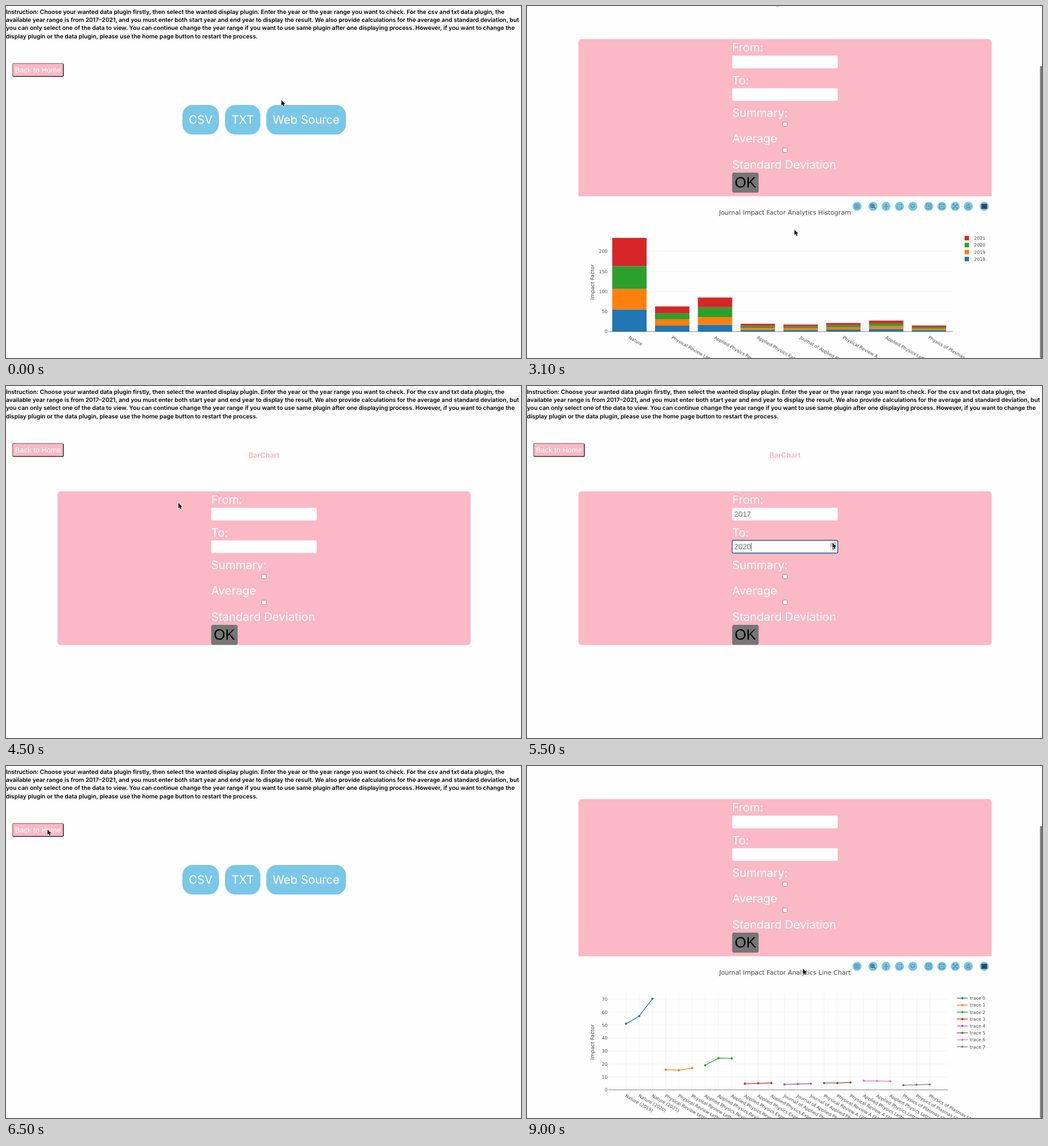
Write an HTML page that moves like this. It is 905 px wide and 619 px high and loops after 9.1 s.

```html
<!DOCTYPE html>
<html lang="en">
<head>
<meta charset="utf-8">
<title>Journal Impact Factor Analytics</title>
<style>
html, body { margin: 0; width: 100%; height: 100%; overflow: hidden; background: #fefefe; }
svg { display: block; width: 905px; height: 619px; }
text { font: 20.4px Inter, "Open Sans", sans-serif; font-optical-sizing: none; text-rendering: geometricPrecision; white-space: pre; }
.info { font-size: 10.31px; font-weight: 600; }
.head { font-size: 12.7px; font-weight: 600; fill: #fab3c1; text-anchor: middle; }
.ui { font-family: "Liberation Sans", Arial, sans-serif; }
.plot text { font: 7.8px "DejaVu Sans", Verdana, sans-serif; fill: #444; }
.plot .title { font-size: 11.05px; text-anchor: middle; }
.plot .axis { font-size: 9.1px; text-anchor: middle; }
.plot .tick { text-anchor: end; }
</style>
</head>
<body>
<svg id="stage" viewBox="0 0 905 619"></svg>
<script>
const LOOP = 9100, STEP = 100, PAGE = 746, VIEW = 619;
const PINK = '#fbb8c5', BLUE = '#7ac7e8';
const COLORS = ['#1f77b4', '#ff7f0e', '#2ca02c', '#d62728', '#9467bd', '#8c564b', '#e377c2', '#7f7f7f'];
const stage = document.getElementById('stage');

const INFO = [
  'Instruction: Choose your wanted data plugin firstly, then select the wanted display plugin. Enter the year or the year range you want to check. For the csv and txt data plugin, the',
  'available year range is from 2017–2021, and you must enter both start year and end year to display the result. We also provide calculations for the average and standard deviation, but',
  'you can only select one of the data to view. You can continue change the year range if you want to use same plugin after one displaying process. However, if you want to change the',
  'display plugin or the data plugin, please use the home page button to restart the process.'
];

// Impact factors for 2017 to 2021
const JOURNALS = [
  ['Nature', 42, 55, 51, 57, 70.3],
  ['Physical Review Letters', 14, 15, 15.6, 15.2, 16.8],
  ['Applied Physics Reviews', 13, 17, 19, 24.5, 24.3],
  ['Applied Physics Express', 4.2, 4.4, 4.7, 5, 5.3],
  ['Journal of Applied Physics', 3.9, 4, 4.2, 4.5, 4.7],
  ['Physical Review A', 4.8, 5, 5.3, 5.3, 5.7],
  ['Applied Physics Letters', 6.6, 6.8, 7, 6.9, 6.6],
  ['Physics of Plasmas', 3.2, 3.4, 3.6, 3.9, 4.2]
];

// Page shown from each moment on
const SCENES = [
  [0, 'home'], [400, 'pick'], [1500, 'form', 'Histogram'], [2600, 'chart', 'Histogram'],
  [3700, 'home'], [4100, 'pick'], [4500, 'form', 'Bar'], [5700, 'chart', 'Bar'],
  [6500, 'home'], [7000, 'pick'], [7500, 'form', 'Line'], [8500, 'chart', 'Line']
];
// Year fields: time, from, to, focused field
const FIELDS = [
  [0, '', '', -1], [1900, '2017', '', 0], [2000, '2018', '', 0], [2200, '2018', '2020', 1],
  [2300, '2018', '2021', 1], [2600, '', '', -1],
  [4800, '2017', '', 0], [5100, '2017', '2017', 1], [5200, '2017', '2018', 1],
  [5300, '2017', '2019', 1], [5400, '2017', '2020', 1], [5700, '', '', -1],
  [7700, '2017', '', 0], [7800, '2018', '', 0], [7900, '2019', '', 0],
  [8100, '2019', '2019', 1], [8200, '2019', '2020', 1], [8300, '2019', '2021', 1], [8500, '', '', -1]
];
const CURSOR = [
  [0, 484, 165], [100, 571, 202], [300, 571, 202], [1000, 569, 230], [1200, 569, 230], [1300, 569, 231],
  [1500, 571, 228], [1700, 633, 208], [1900, 538, 220], [2000, 538, 220], [2200, 538, 276], [2300, 538, 276],
  [2500, 386, 436], [2700, 470, 400], [3300, 470, 390], [3600, 64, 105], [3700, 66, 107], [4000, 344, 202],
  [4100, 342, 203], [4300, 303, 205], [4500, 303, 205], [4800, 538, 219], [4900, 538, 219], [5100, 537, 275],
  [5500, 537, 275], [5600, 386, 437], [5800, 440, 400], [6100, 440, 390], [6400, 73, 111], [6500, 73, 111],
  [6900, 416, 203], [7000, 416, 203], [7300, 418, 204], [7500, 418, 204], [7700, 538, 219], [7900, 538, 219],
  [8000, 540, 276], [8300, 540, 276], [8400, 387, 437], [8500, 387, 437], [8700, 470, 380], [9000, 485, 356]
];
const SCROLL = [
  [0, 0], [2700, 0], [2900, 127], [3200, 127], [3400, 0], [5800, 0], [6000, 127], [6100, 127],
  [6300, 0], [8600, 0], [8900, 127], [LOOP, 127]
];

const at = (list, t) => list.findLast(k => k[0] <= t);
const range = (n, f) => Array.from({ length: n }, (_, i) => f(i)).join('');

function tween(list, t) {
  const i = list.findLastIndex(k => k[0] <= t), a = list[i], b = list[i + 1] || a;
  const p = b === a ? 0 : (t - a[0]) / (b[0] - a[0]), e = p * p * (3 - 2 * p);
  return a.slice(1).map((v, j) => v + (b[j + 1] - v) * e);
}

const text = (x, y, s, cls = '', extra = '') => `<text x="${x}" y="${y}" class="${cls}" ${extra}>${s}</text>`;
const rect = (x, y, w, h, fill, extra = '') =>
  `<rect x="${x}" y="${y}" width="${w}" height="${h}" fill="${fill}" ${extra}/>`;
const line = (x1, y1, x2, y2, color, w = 0.65) =>
  `<path d="M${x1} ${y1}L${x2} ${y2}" stroke="${color}" stroke-width="${w}" fill="none"/>`;

function header(pressed) {
  const [lit, dark] = pressed ? ['#111', '#777'] : ['#777', '#111'];
  return INFO.map((s, i) => text(0, 14 + i * 14.2, s, 'info')).join('') +
    rect(11.7, 101.2, 89.1, 22.7, PINK, 'rx="1.8"') +
    `<g fill="none" stroke-width="1.3"><path d="M12.2 123.4Q11.7 123 11.7 122V103Q11.7 101.2 13.5 101.2H99Q100 101.2 100.4 101.7" stroke="${lit}"/>` +
    `<path d="M12.2 123.4Q12.6 123.9 13.5 123.9H99Q100.8 123.9 100.8 122V103Q100.8 102.2 100.4 101.7" stroke="${dark}"/></g>` +
    text(56.2, 117, 'Back to Home', 'ui', 'fill="#fff" text-anchor="middle" style="font-size:12.9px"');
}

function buttons(list) {
  return list.map(([x, w, label]) =>
    rect(x - 1.5, 172.5, w + 3, 55, BLUE, 'rx="19.5" stroke="#fff" stroke-width="3"') +
    text(x + w / 2, 207.4, label, '', 'fill="#fff" text-anchor="middle"')).join('');
}

const home = () => buttons([[310, 64, 'CSV'], [385, 62, 'TXT'], [457.5, 140, 'Web Source']]);
const pick = () => buttons([[249, 104, 'BarChart'], [364, 112, 'LineChart'], [487, 171, 'HistogramChart']]);

function spinner(y, hover) {
  return rect(533, y + 3.5, 10.5, 16, '#efefef') + (hover ? rect(533, y + 3.5, 10.5, 8, '#c4c4c4') : '') +
    `<path d="M535.6 ${y + 9.3}l2.4-3 2.4 3zM535.6 ${y + 13.8}l2.4 3 2.4-3z" fill="#444"/>`;
}

function field(y, value, focused, [cx, cy]) {
  const hover = cx > 360 && cx < 546 && cy > y && cy < y + 22;
  const ring = focused ? 'rx="2" stroke="#1a5a9c" stroke-width="1.4"' : 'rx="2"';
  return rect(360.5, y, 185.5, 22.3, '#fff', ring) +
    text(364, y + 15.8, value, 'ui', 'fill="#757575" style="font-size:13.4px"') +
    (focused && value && hover ? line(394, y + 4, 394, y + 18.5, '#333', 0.8) : '') +
    (focused || hover ? spinner(y, hover && cx > 532) : '');
}

function form(kind, fields, hasChart, mouse) {
  const [, from, to, focus] = fields, bottom = hasChart ? 461.5 : 455.5;
  const corner = hasChart ? `V${bottom}H90.5` : `V${bottom - 6}q0 6-6 6H96.5q-6 0-6-6`;
  const label = (y, s) => text(360.5, y, s, '', 'fill="#fff"');
  const box = y => rect(449.6, y, 7.6, 7.6, '#fff', 'rx="1.5" stroke="#767676" stroke-width=".8"');
  return text(453.3, 125.8, kind + 'Chart', 'head') +
    `<path d="M96.5 185.3H810.5q6 0 6 6${corner}V191.3q0-6 6-6z" fill="${PINK}"/>` +
    label(207.3, 'From:') + field(214.3, from, focus === 0, mouse) +
    label(264.5, 'To:') + field(271.5, to, focus === 1, mouse) +
    label(321.7, 'Summary:') + box(331.2) + label(367.3, 'Average') + box(376.7) +
    label(412.8, 'Standard Deviation') +
    rect(360.5, 420, 46.5, 35.2, '#767676', 'rx="3.5"') +
    text(383.8, 446.3, 'OK', 'ui', 'text-anchor="middle" style="font-size:26px"');
}

const slanted = (x, y, s) => `<text transform="translate(${x - 2} ${y + 12})rotate(30)">${s}</text>`;

function axes(right, zero, unit, step, max) {
  return range(Math.floor(max / step) + 1, i => {
    const y = zero - i * step * unit;
    return (i ? line(143, y, right, y, '#eee') : '') + text(141.5, y + 2.9, i * step, 'tick');
  }) + '<text class="axis" transform="translate(118 612.3)rotate(-90)">Impact Factor</text>';
}

function histogram() {
  const zero = 699.5, unit = 0.706;
  const bars = JOURNALS.map(([name, , ...values], i) => {
    const x = 180 + i * 75.2;
    let y = zero;
    return slanted(x, zero, name) +
      values.map((v, k) => rect(x - 30.2, y -= v * unit, 60.4, v * unit, COLORS[k])).join('');
  }).join('');
  const legend = range(4, i => rect(769, 531.3 + i * 12.25, 7.8, 7.8, COLORS[3 - i]) +
    text(785.5, 538 + i * 12.25, 2021 - i));
  return axes(748, zero, unit, 50, 230) + bars + line(143, zero, 748, zero, '#444') + legend;
}

// Line and bar charts share one category for each journal and year
function series(kind, first, count) {
  const isBar = kind === 'Bar', zero = 696.5, unit = isBar ? 2.8 : 2.277, gap = 557 / (8 * count);
  let grid = '', marks = '';
  JOURNALS.forEach(([name, ...all], i) => {
    const c = COLORS[i];
    const pts = all.slice(first, first + count).map((v, k) => {
      const x = 174 + (gap - 23.2) / 2 + (i * count + k) * gap;
      grid += line(x, 528, x, zero, '#eee') + slanted(x, zero, `${name} (${2017 + first + k})`);
      return [x, zero - v * unit];
    });
    marks += isBar
      ? pts.map(([x, y]) => rect(x - gap * 0.4, y, gap * 0.8, zero - y, c)).join('')
      : `<polyline points="${pts.join(' ')}" fill="none" stroke="${c}" stroke-width="1.3"/>` +
        pts.map(([x, y]) => `<circle cx="${x}" cy="${y}" r="2" fill="${c}"/>`).join('');
  });
  const legend = range(8, i => {
    const y = 535.3 + i * 12.2, c = COLORS[i];
    const key = isBar ? rect(761, y - 4, 7.8, 7.8, c)
      : line(755.5, y, 774.5, y, c, 1.3) + `<circle cx="765" cy="${y}" r="2" fill="${c}"/>`;
    return key + text(778, y + 2.8, 'trace ' + i);
  });
  return grid + axes(740, zero, unit, 10, isBar ? 57 : 70) +
    line(143, zero, 740, zero, '#444') + marks + legend;
}

const ICONS = [
  [580, 'M-4-2.5h2l1-1.5h2l1 1.5h2v6h-8zM-1.6.5a1.6 1.6 0 1 0 3.2 0a1.6 1.6 0 1 0-3.2 0'],
  [608, 'M-4-1a3 3 0 1 0 6 0a3 3 0 1 0-6 0M1.2 1.2l3 3M-2.4-1h2.8M-1-2.4v2.8'],
  [631, 'M-4.5 0h9M0-4.5v9M-1.2-3.3l1.2-1.2 1.2 1.2M-1.2 3.3l1.2 1.2 1.2-1.2'],
  [654.5, 'M-4-3.5h2M-1-3.5h2M2-3.5h2v2M4 0v3.5h-2M1 3.5h-2M-2 3.5h-2v-2M-4 1v-2'],
  [678, 'M-2 1.5c-4-2-1-5 2-5s5 3 2 4.5-4-.5-4 1 1 1 1 2'],
  [706, 'M-4-4h8v8h-8zM-2.3 0h4.6M0-2.3v4.6'],
  [729, 'M-4-4h8v8h-8zM-2.3 0h4.6'],
  [752.5, 'M-4-4l8 8M4-4l-8 8M-4-1.8v-2.2h2.2M4 1.8v2.2h-2.2M1.8-4h2.2v2.2M-1.8 4h-2.2v-2.2'],
  [775.5, 'M-4.5 0l4.5-4 4.5 4M-3 0v3.8h2v-2.6h2v2.6h2v-3.8'],
  [803.5, '']
];

function toolbar() {
  return ICONS.map(([x, d], i) => `<g transform="translate(${x} 479.3)">` +
    `<circle r="9" fill="${BLUE}" stroke="#fff" stroke-width="2"/>` +
    (d ? `<path d="${d}" fill="none" stroke="${i === 1 ? '#31586b' : '#5590ac'}" stroke-width="1.3"/>`
      : rect(-5, -4.5, 10, 9, '#30475f')) + '</g>').join('');
}

function chart(kind, hover) {
  const name = kind === 'Histogram' ? kind : kind + ' Chart';
  const body = kind === 'Histogram' ? histogram() : kind === 'Bar' ? series(kind, 0, 4) : series(kind, 2, 3);
  return `<g class="plot">${text(453.3, 493.8, 'Journal Impact Factor Analytics ' + name, 'title')}${body}</g>` +
    (hover ? toolbar() : '');
}

function render(t) {
  const [, page, kind] = at(SCENES, t), [cx, cy] = tween(CURSOR, t), [scroll] = tween(SCROLL, t);
  const mouse = [cx, cy + scroll], hasChart = page === 'chart';
  const body = page === 'home' ? home() : page === 'pick' ? pick()
    : form(kind, at(FIELDS, t), hasChart, mouse) + (hasChart ? chart(kind, mouse[1] > 462) : '');
  const bar = scroll > 0
    ? rect(901.5, scroll * VIEW / PAGE, 5, VIEW * VIEW / PAGE, '#7b7b7b', 'rx="1.5"') : '';
  stage.innerHTML = rect(0, 0, 905, VIEW, '#fefefe') +
    `<g transform="translate(0 ${-scroll})">${header(t === 3600)}${body}</g>${bar}` +
    `<path transform="translate(${cx} ${cy + 0.8})" d="M0 0V9.2L2.2 7.3 3.6 10.5 5.2 9.8 3.8 6.7H6.6Z" ` +
    'stroke="#fff" stroke-width="1.2" paint-order="stroke"/>';
}

let start, last = -1;
function tick(now) {
  start ??= now;
  const t = Math.floor((now - start) % LOOP / STEP) * STEP;
  if (t !== last) render(last = t);
  requestAnimationFrame(tick);
}
render(0);
requestAnimationFrame(tick);
</script>
</body>
</html>
```
